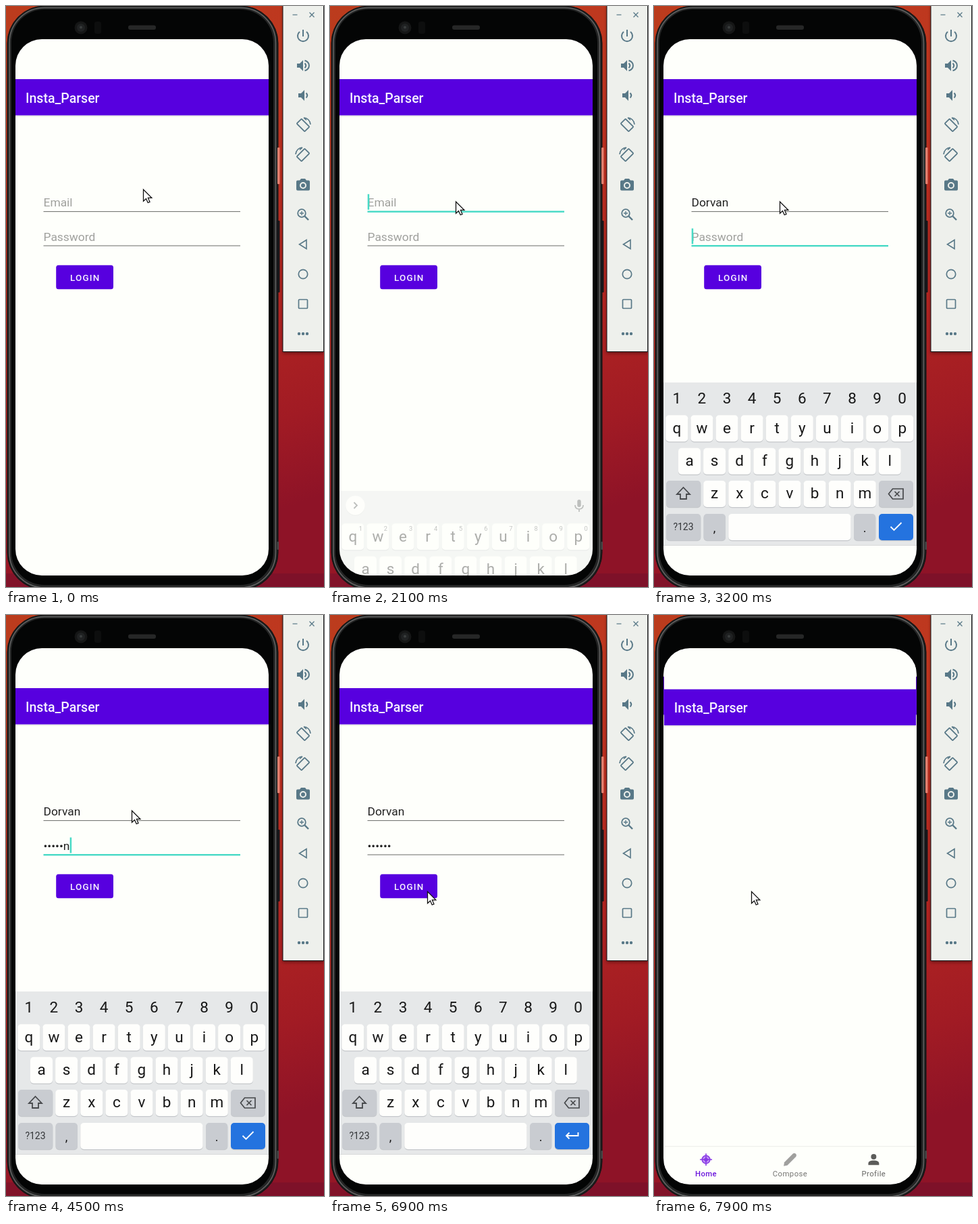
Write an HTML page that moves like this. It is 471 px wide and 858 px high and loops after 8 s.

```html
<!DOCTYPE html>
<html lang="en">
<head>
<meta charset="utf-8">
<title>Login demo</title>
<style>
  html, body { margin: 0; width: 100%; height: 100%; overflow: hidden; background: #a01c24; }
  svg { display: block; width: 471px; height: 858px; font-family: Roboto, sans-serif; }
  text { white-space: pre; }
</style>
</head>
<body>
<svg id="stage" viewBox="0 0 471 858"></svg>
<script>
const PAPER = '#fefffb', PURPLE = '#5700df', TEAL = '#48dac6', SLATE = '#587887';
const LOOP = 8000, STEP = 100, CENTER = [201.5, 445];
const NAME = 'Dorvan';

const rect = (x, y, w, h, fill, rx = 0, extra = '') =>
  `<rect x="${x}" y="${y}" width="${w}" height="${h}" rx="${rx}" fill="${fill}" ${extra}/>`;
const circle = (x, y, r, fill, extra = '') =>
  `<circle cx="${x}" cy="${y}" r="${r}" fill="${fill}" ${extra}/>`;
const label = (x, y, size, str, fill, extra = '') =>
  `<text x="${x}" y="${y}" font-size="${size}" fill="${fill}" ${extra}>${str}</text>`;
const centered = (x, y, size, str, fill = '#171717', extra = '') =>
  label(x, y, size, str, fill, 'text-anchor="middle" ' + extra);
// Icon paths are drawn around their own centre.
const line = (x, y, d, color = SLATE, width = 2, extra = '') =>
  `<path transform="translate(${x} ${y})" d="${d}" fill="none" stroke="${color}" stroke-width="${width}" ${extra}/>`;
const solid = (x, y, d, color = SLATE) =>
  `<path transform="translate(${x} ${y})" d="${d}" fill="${color}"/>`;
const dots = (x, y, r, gap, color) => [-gap, 0, gap].map(d => circle(x + d, y, r, color)).join('');

function phone() {
  return rect(0, 0, 471, 858, 'url(#wall)') +
    rect(0, 838, 471, 20, '#5a1030', 0, 'opacity=".3"') +
    rect(2, 0, 401, 862, '#1c1d1d', 55, 'stroke="#121212"') +
    rect(5, 2.5, 394.5, 856.5, '#242525', 52, 'stroke="#636464" stroke-width="1.5"') +
    rect(8, 5, 388, 850, '#040505', 49) +
    rect(402, 209, 3.5, 54, '#e0806f', 1) + rect(401, 317, 4.5, 106, '#17171a', 1) +
    rect(401.5, 791, 2.5, 12, '#484848', 1) +
    circle(111, 32, 9.5, '#151616') + circle(111, 32, 6, '#202223') +
    circle(111, 31.5, 2, '#393d3d') + rect(131, 23, 10, 18, '#0d0e0e', 3) +
    rect(181, 28.5, 41, 6.5, '#262727', 3);
}

function emulatorPanel() {
  const x = 440;
  const speaker = dx => `M${-9 + dx} -3h4l5 -5v16l-5 -5h-4z`;
  const rotate = y => `<g transform="translate(${x} ${y})">
    ${rect(-5, -8.3, 10, 16.6, 'none', 1, `transform="rotate(-45)" stroke="${SLATE}" stroke-width="1.8"`)}
    ${line(0, 0, 'M1 -11C6 -11 10.5 -7 11 -1M1 -11l4 3.5', SLATE, 1.6)}</g>`;
  return rect(410, 0, 61, 513, '#2a0808', 0, 'filter="url(#soft)" opacity=".5"') +
    rect(410, -1, 60.5, 511.5, '#eef0ec', 0, 'stroke="#17171a"') +
    line(428, 13, 'M-3.5 0h7', SLATE, 1.2) + line(453, 13, 'M-3.5 -3.5l7 7m0 -7l-7 7', SLATE, 1.3) +
    line(x, 44, 'M0 -9V1M-5 -6A8 8 0 1 0 5 -6') +
    solid(x, 88, speaker(0)) + line(x, 88, 'M2.5 -3.5Q6 0 2.5 3.5M2.5 -7.5C11 -5 11 5 2.5 7.5') +
    solid(x, 132, speaker(2)) + line(x, 132, 'M4.5 -3.5Q8 0 4.5 3.5') +
    rotate(176) + `<g transform="matrix(-1 0 0 1 880 0)">${rotate(220)}</g>` +
    solid(x, 264, 'M-3 -9h6l2 2.5h3a2 2 0 0 1 2 2v11a2 2 0 0 1 -2 2h-16a2 2 0 0 1 -2 -2v-11a2 2 0 0 1 2 -2h3z') +
    circle(x, 265, 4, 'none', 'stroke="#eef0ec" stroke-width="2"') +
    circle(438, 306, 5.8, 'none', `stroke="${SLATE}" stroke-width="1.8"`) +
    line(438, 306, 'M-3 0h6M0 -3v6', SLATE, 1.3) + line(438, 306, 'M4.5 4.5l5.5 5.5', SLATE, 2.4) +
    line(x, 352, 'M5 -6.5v13l-10.5 -6.5z', SLATE, 1.6) +
    circle(x, 396, 6.7, 'none', `stroke="${SLATE}" stroke-width="1.7"`) +
    rect(433.5, 433.5, 13, 13, 'none', 1, `stroke="${SLATE}" stroke-width="1.7"`) +
    dots(x, 484, 2.2, 6, SLATE);
}

const appBar = () => rect(14, 161.5, 375, 2, '#000', 0, 'opacity=".08"') +
  rect(14, 108, 375, 53.5, PURPLE) +
  label(29, 142.9, 19.5, 'Insta_Parser', '#f7f2ff', 'font-weight="500"');

const field = (id, base) =>
  `<text id="${id}Text" x="55.5" y="${base}" font-size="17.4"></text>
   <rect id="${id}Line" x="55.5" width="291.5"/>
   ${rect(0, base - 18.5, 2.5, 23, TEAL, 0, `id="${id}Caret"`)}`;

function loginScreen() {
  return rect(14, 49, 375, 792, PAPER) + appBar() + field('mail', 296.3) + field('pass', 347) +
    rect(74, 385, 85.5, 36, '#000', 5, 'id="shadow" filter="url(#soft)"') +
    rect(74.2, 382.7, 84.8, 35.5, PURPLE, 3.5, 'id="button"') +
    label(95, 406, 13.4, 'LOGIN', '#f8f3ff', 'font-weight="500" letter-spacing="1.2"');
}

function homeScreen() {
  const tab = (x, str, color, weight) =>
    centered(x, 831, 11.4, str, color, `letter-spacing=".45" font-weight="${weight}"`);
  return rect(14, 49, 375, 792, PAPER) + appBar() + rect(14, 786, 375, 1, '#ebece8') +
    circle(76.4, 806, 5.8, '#c49af3', 'stroke="#8a3be6" stroke-width="1.7"') +
    line(76.4, 806, 'M0 -9V9M-9 0H9', '#8a3be6', 1.6) +
    solid(76.4, 806, 'M0 -4L4 0 0 4 -4 0z', '#8a3be6') +
    solid(201.5, 806, 'M-9.5 9.5l1 -5.5L4 -8.5Q6.5 -10.5 8.5 -8.5T8.5 -4L-4 8.5z', '#a0a09e') +
    circle(326, 801.8, 4, '#5c5c5a') + solid(326, 806, 'M-8 8V5.5C-8 0 8 0 8 5.5V8z', '#5c5c5a') +
    tab(76.4, 'Home', '#6a14dd', 500) + tab(201.5, 'Compose', '#747472', 400) +
    tab(326, 'Profile', '#656563', 400);
}

function keyboard() {
  const PITCH = 37.1, INK = '#47494c', GRAY = '#c9ccd1';
  const key = (x, y, w, fill = '#fefefc') =>
    rect(x, y + 1.2, w, 39, '#c5c8cb', 5) + rect(x, y, w, 39, fill, 5);
  const row = (letters, x, y) => [...letters].map((c, i) =>
    key(x + i * PITCH - 16.5, y, 33) + centered(x + i * PITCH, y + 26.3, 22.5, c)).join('');
  const digits = (dx, y, size, color) => [...'1234567890'].map((c, i) =>
    centered(33.8 + dx + i * PITCH, y, size, c, color)).join('');
  const gear = Array.from({ length: 8 }, (_, i) =>
    rect(139.3, 569, 3.4, 4, INK, 0, `transform="rotate(${i * 45} 141 578)"`)).join('');

  const tools = line(87, 578, 'M-3 -6.5h-4v14h14v-14h-4M-3.5 -1h7M-3.5 2h7M-3.5 5h4', INK, 1.5) +
    rect(83.5, 569, 7, 4.5, INK, 1) +
    gear + circle(141, 578, 4.5, 'none', `stroke="${INK}" stroke-width="3.6"`) +
    solid(195, 578, 'M0 -8.5C-11 -8.5 -11 8 0 8.5c3 0 1 -3 2 -4.5s7 1 7 -4C9 -5 5 -8.5 0 -8.5z', INK) +
    [[-5, 0], [-2.5, -4], [2.5, -4], [5, 0]].map(([x, y]) => circle(195 + x, 578 + y, 1.3, '#e6e8e9')).join('') +
    line(249, 578, 'M-1 7h-6v-14h14v6M0 7V0l7 3 -3 1.5z', INK, 1.7) +
    rect(281, 568, 1, 20, '#cdcfd0') + dots(316, 578, 1.8, 6, INK) +
    line(369, 578, 'M-8 -8L8 8', '#e6e8e9', 4) + line(369, 578, 'M-8 -8L8 8', INK, 1.8);

  const mailPart = circle(37.5, 578.3, 14.5, '#d3d5d6') + circle(37.5, 577.5, 14.3, '#fefefc') +
    line(37.5, 577.5, 'M2 -4.5L-2.5 0 2 4.5', INK, 1.8, 'id="chevron"') +
    rect(366.3, 569, 5.4, 11, INK, 2.7) + line(369, 578, 'M-6 -1Q-6 5 0 5T6 -1M0 5v4', INK, 1.7) +
    `<g id="tools">${tools}</g>` + digits(11.5, 615, 9.3, '#55575a') +
    centered(89.5, 776, 17.5, '@') + key(110.3, 750, 32.5) + key(147.2, 750, 144.3) +
    circle(126.5, 769, 8, 'none', `stroke="${INK}" stroke-width="1.7"`) +
    circle(123.6, 766.8, 1.3, INK) + circle(129.4, 766.8, 1.3, INK) +
    line(126.5, 769, 'M-4.3 2Q0 7 4.3 2', INK, 1.5);
  const passPart = digits(0, 587, 22.5, '#171717') + centered(89.5, 777, 18, ',') + key(110.3, 750, 181.2);
  const action = (id, d) => line(358.5, 769, d, '#fff', 1.9, `id="${id}"`);

  return rect(14, 556, 375, 241, '#e6e8e9') + rect(14, 796, 375, 1, '#d9dbdb') +
    row('qwertyuiop', 33.8, 604.3) + row('asdfghjkl', 52.5, 652.8) + row('zxcvbnm', 89.7, 701) +
    key(18, 701, 51.3, GRAY) + line(43.5, 720, 'M0 -9L9.5 1H4.5v7h-9V1h-5z', INK, 1.8) +
    key(333, 701, 51, GRAY) + line(358.5, 720.5, 'M-11 0l6 -7.5h15.5v15h-15.5zM-2 -3.5l7 7m0 -7l-7 7', INK, 1.7) +
    key(18, 750, 51.3, GRAY) + centered(43.5, 774.3, 14, '?123', '#333538') +
    key(73.5, 750, 32.5, GRAY) + key(296, 750, 32.3, GRAY) + centered(312, 777, 18, '.') +
    key(333, 750, 51, '#2473df') +
    `<g id="mailKeys">${mailPart}</g><g id="passKeys">${passPart}</g>` +
    action('next', 'M-10 0H5M0 -5l5 5 -5 5M9 -6V6') + action('done', 'M-8 0l5 5L8 -6') +
    action('enter', 'M9 -5v5H-8M-4 -4.5L-8.5 0 -4 4.5');
}

document.getElementById('stage').innerHTML = `
  <defs>
    <linearGradient id="wall" x2=".2" y2="1">
      <stop stop-color="#bb3c1d"/><stop offset=".3" stop-color="#bf3520"/>
      <stop offset=".64" stop-color="#b12521"/><stop offset=".85" stop-color="#a11b24"/>
      <stop offset="1" stop-color="#8e1327"/>
    </linearGradient>
    <clipPath id="glass">${rect(14, 49, 375, 792, '#fff', 39)}</clipPath>
    <filter id="soft" x="-20%" y="-30%" width="140%" height="180%"><feGaussianBlur stdDeviation="2"/></filter>
  </defs>
  ${phone()}${emulatorPanel()}
  <g clip-path="url(#glass)">
    <g id="login">${loginScreen()}</g>
    <g id="keyboard">${keyboard()}</g>
    <g id="home">${homeScreen()}</g>
  </g>
  <path id="pointer" d="M0 0V17.2l4-3.7 2.7 6 2.8-1.2-2.6-5.9h5.4z" fill="#fff" stroke="#111" stroke-width="1.3"/>`;

const el = {};
document.querySelectorAll('[id]').forEach(node => el[node.id] = node);
const show = (node, on) => node.style.display = on ? '' : 'none';
const set = (node, attrs) => Object.entries(attrs).forEach(([k, v]) => node.setAttribute(k, v));

// Points are [time, ...values]; values are interpolated linearly.
function track(points, t) {
  const i = points.findIndex(p => p[0] > t);
  if (i === 0) return points[0].slice(1);
  if (i < 0) return points.at(-1).slice(1);
  const a = points[i - 1], b = points[i], k = (t - a[0]) / (b[0] - a[0]);
  return a.slice(1).map((v, j) => v + (b[j + 1] - v) * k);
}
// Points are [time, value]; the latest value holds.
const latest = (points, t) => points.reduce((value, [at, next]) => t >= at ? next : value, points[0][1]);

const POINTER = [[100, 203.5, 271], [900, 186.5, 289], [6100, 186.5, 289],
  [6200, 178.5, 357], [6300, 152, 396], [6400, 144.5, 408.5]];
const KEYBOARD = [[2000, 285, 0], [2100, 160, .35], [2200, 35, .85], [2300, 0, 1]];
const MAIL = [[0, 0], [2200, 1], [2300, 2], [2500, 3], [2700, 6]];
const PASS = [[0, 0], [3700, 2], [4000, 3], [4300, 5], [4500, 6]];
const BUTTON = [[4800, 87, 0, 223, 0], [4900, 127, 34, 234, .3], [6500, 127, 34, 234, .3],
  [6600, 145, 62, 238, .4], [6900, 87, 0, 223, 0]];
const TRANSITION = [[7600, 1, .88, 0], [7700, 1.019, .907, .32], [7800, 1.04, .97, .85], [7900, 1.05, .995, 1]];

function drawField(id, y, value, hint, focused, caret) {
  const text = el[id + 'Text'];
  text.textContent = value || hint;
  set(text, { fill: value ? '#222' : '#a0a19e' });
  set(el[id + 'Line'], { y: y - (focused ? .5 : 0), height: focused ? 2.4 : 1.1, fill: focused ? TEAL : '#797a77' });
  set(el[id + 'Caret'], { x: 55.7 + (value ? text.getComputedTextLength() : 0) });
  show(el[id + 'Caret'], focused && caret);
}

const zoom = s => `translate(${CENTER}) scale(${s}) translate(${CENTER.map(c => -c)})`;

function draw(t) {
  const [x, y] = track(POINTER, t);
  set(el.pointer, { transform: `translate(${x} ${y})` });

  const focus = latest([[0, ''], [1000, 'mail'], [3000, 'pass'], [4900, 'button']], t);
  drawField('mail', 303, NAME.slice(0, latest(MAIL, t)), 'Email', focus === 'mail', t < 1700 || t >= 2100);
  const typed = latest(PASS, t), masked = t >= 4800 ? typed : Math.max(0, typed - 1);
  drawField('pass', 353.5, '•'.repeat(masked) + NAME.slice(masked, typed), 'Password', focus === 'pass', true);

  const [r, g, b, shade] = track(BUTTON, t);
  set(el.button, { fill: `rgb(${r} ${g} ${b})` });
  set(el.shadow, { opacity: shade });

  const [drop, alpha] = track(KEYBOARD, t);
  const passKeys = t >= 3200, opened = t >= 2300;
  set(el.keyboard, { transform: `translate(0 ${drop})`, opacity: alpha });
  show(el.keyboard, t >= 2100 && t < 7700);
  show(el.mailKeys, !passKeys);
  show(el.passKeys, passKeys);
  show(el.tools, opened);
  set(el.chevron, { transform: `translate(37.5 577.5) scale(${opened ? 1 : -1} 1)` });
  show(el.next, !passKeys);
  show(el.done, passKeys && focus === 'pass');
  show(el.enter, focus === 'button');

  const [oldScale, newScale, fade] = track(TRANSITION, t);
  set(el.login, { transform: zoom(oldScale) });
  set(el.home, { transform: zoom(newScale), opacity: fade });
  show(el.home, fade > 0);
}

function tick() {
  draw(Math.floor(performance.now() % LOOP / STEP) * STEP);
  requestAnimationFrame(tick);
}
tick();
</script>
</body>
</html>
```
